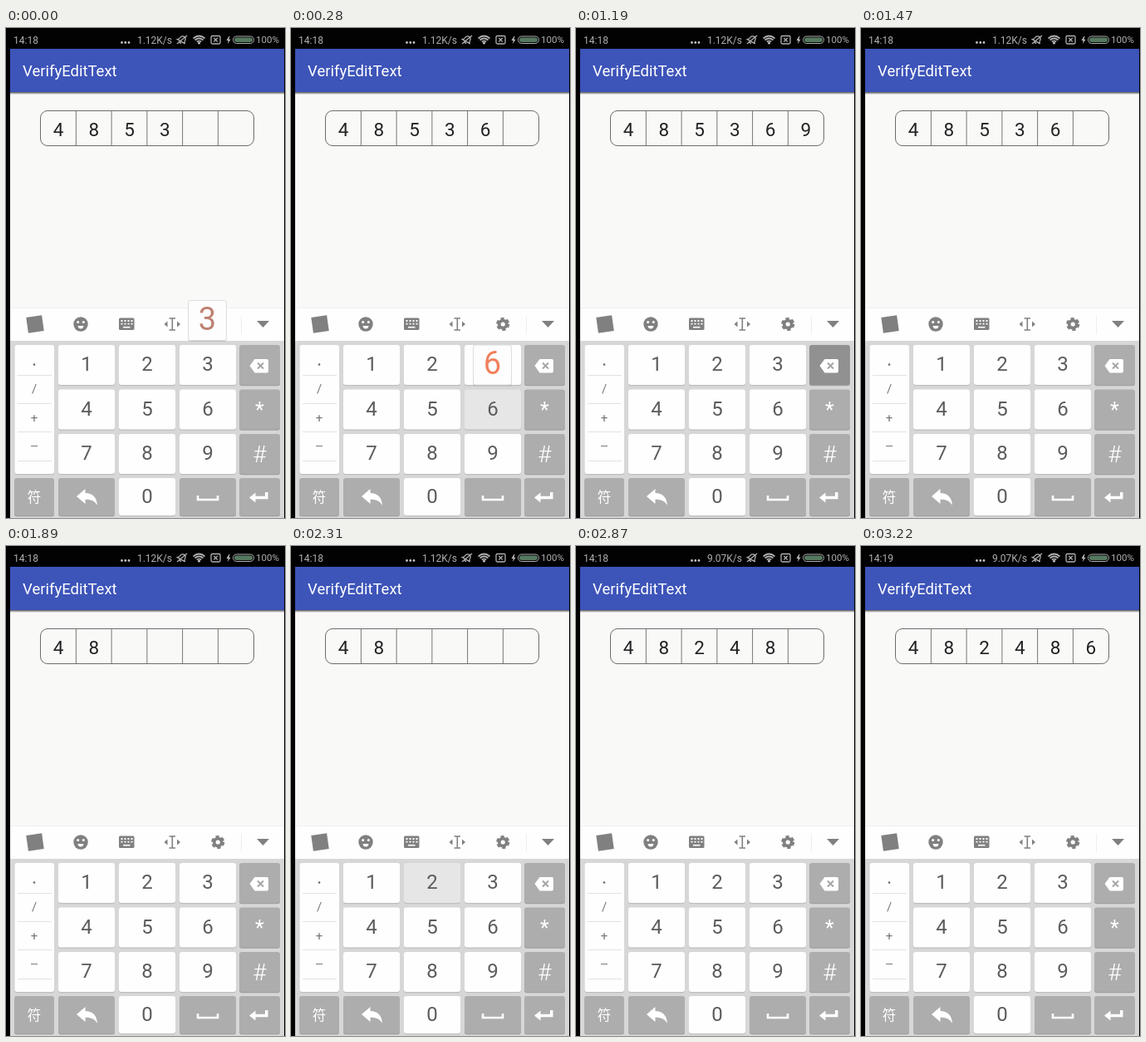
An HTML page that plays this animation: 336x589 px, repeating every 3710 ms.

```html
<!DOCTYPE html>
<html lang="en">
<head>
<meta charset="utf-8">
<title>Verify code input</title>
<style>
  html, body { margin: 0; width: 100%; height: 100%; overflow: hidden; background: #000; }
  svg { display: block; width: 100vw; height: 100vh; }
  text { font-family: Roboto, "Noto Sans", sans-serif; }
  .mid { text-anchor: middle; }
  .status { font-size: 12px; fill: #b0b0b0; }
  .cjk { font: 16.5px "Noto Sans CJK SC", "Noto Sans CJK", sans-serif; fill: #fff; }
  .code { font-size: 22.5px; fill: #222; }
  .digit { font-size: 24px; fill: #5c5c5c; }
  .sign { font-size: 15px; fill: #777; }
  .light { fill: #fefefe; }
  .gray { fill: #adadad; }
  .light.down { fill: #e6e6e6; }
  .gray.down { fill: #919191; }
</style>
</head>
<body>
<svg viewBox="0 0 336 589" preserveAspectRatio="none">
  <defs>
    <linearGradient id="shade" x2="0" y2="1">
      <stop stop-color="#000" stop-opacity=".65"/>
      <stop offset="1" stop-color="#000" stop-opacity="0"/>
    </linearGradient>
  </defs>

  <rect width="336" height="589" fill="#020203"/>
  <rect x="5" y="25" width="330" height="564" fill="#f9f9f8"/>
  <rect x="5" y="25" width="330" height="52" fill="#3d54b9"/>
  <rect x="5" y="77" width="330" height="3" fill="url(#shade)"/>
  <text x="20" y="58" font-size="18.5" fill="#fff">VerifyEditText</text>

  <!-- status bar -->
  <text id="clock" class="status" x="9" y="18.5"></text>
  <text id="speed" class="status" x="200" y="18.5" text-anchor="end"></text>
  <text class="status" x="301" y="18" style="font-size:11.5px">100%</text>
  <g fill="#c0c0c0">
    <circle cx="139.5" cy="17.5" r="1.4"/><circle cx="143.8" cy="17.5" r="1.4"/><circle cx="148" cy="17.5" r="1.4"/>
    <path d="M268.500 10l-3 5h2.200l-.8 4 3.600-5.300h-2.200l1.200-3.700z"/>
    <circle cx="232.500" cy="18" r="1.600"/>
  </g>
  <g fill="none" stroke="#b0b0b0" stroke-width="1.300">
    <path d="M207 16.500q2-1.500 2-4.500 1-2.500 3.500-2.500t3 3q0 3 2 4zM210.500 18.500h3" transform="rotate(30 212 14)"/>
    <path d="M206 19l12-10"/>
    <path d="M225.500 12.500q7-6 14 0M227.500 14.500q5-4 10 0M229.800 16.500q2.700-2 5.400 0" stroke-width="1.700"/>
    <rect x="247" y="9.500" width="11" height="9.500" rx="1.500"/>
    <path d="M250.300 12l4.400 4.500m0-4.500l-4.400 4.500"/>
    <rect x="273.500" y="10" width="25" height="8.500" rx="4.200" stroke-width="1"/>
  </g>
  <rect x="275" y="11.500" width="22" height="5.500" rx="2.700" fill="#55795f"/>

  <!-- code boxes -->
  <g id="code">
    <rect x="41.500" y="99.500" width="257" height="42" rx="8.500" fill="none" stroke="#6c6c6c"/>
  </g>

  <!-- keyboard toolbar -->
  <rect x="5" y="337" width="330" height="39" fill="#fefefe"/>
  <path d="M5 336.500h330" stroke="#f0f0f0"/>
  <path d="M283.500 346v22" stroke="#eee"/>
  <g fill="#808080">
    <rect x="25.500" y="346.500" width="19" height="19" transform="rotate(-8 35 356)"/>
    <circle cx="90" cy="356" r="8.700"/>
    <rect x="136" y="348.500" width="18.500" height="14.500" rx="1.500"/>
    <path d="M194.500 352.500v7l-4-3.500zM206 352.500v7l4-3.500z"/>
    <path d="M302 352h15l-7.500 8z"/>
    <circle cx="255.200" cy="356" r="6.300"/>
  </g>
  <circle cx="255.200" cy="356" r="6.200" fill="none" stroke="#808080" stroke-width="3.800" stroke-dasharray="3.800 2.693"/>
  <circle cx="255.200" cy="356" r="2.600" fill="#fefefe"/>
  <path d="M196.500 349h7.500M196.500 363h7.500M200.300 349v14" stroke="#808080" stroke-width="1.600"/>
  <g fill="#fefefe">
    <circle cx="86.700" cy="353.500" r="1.500"/><circle cx="93.300" cy="353.500" r="1.500"/>
    <path d="M86.500 358h7q-.5 3.500-3.500 3.500t-3.500-3.500z"/>
  </g>
  <path d="M138.500 352h14M138.500 355.700h14" stroke="#fefefe" stroke-width="1.800" stroke-dasharray="2 2"/>
  <path d="M141 359.700h8.500" stroke="#fefefe" stroke-width="1.600"/>

  <!-- keyboard -->
  <rect x="5" y="376" width="330" height="213" fill="#d7d7d7"/>
  <g id="keys"></g>
  <path d="M14 417.500h41M14 451.500h41M14 485.500h41M14 520.500h41" stroke="#e2e2e2"/>
  <g class="mid">
    <circle cx="34" cy="404.500" r="1.300" fill="#666"/>
    <text class="sign" x="34" y="438.500">/</text>
    <text class="sign" x="34" y="473.500">+</text>
    <path d="M30 502.500h8" stroke="#888" stroke-width="1.200"/>
    <text class="cjk" x="34" y="570">符</text>
    <text x="305.500" y="468" font-size="25" fill="#fff">*</text>
    <text x="305.500" y="522" font-size="28" font-weight="300" fill="#fff">#</text>
  </g>
  <g fill="#fff">
    <path d="M293.500 406l6-8h14.500q2 0 2 2v12.500q0 2-2 2h-14.500z"/>
    <path d="M85 563l10.500-9v5q13 0 14.500 14.500-4-7-14.500-7v5.500z"/>
    <path d="M293 564.500l7.500-6v4.300h11.500v-4.800h3.500v8.200h-15v4.300z"/>
  </g>
  <path d="M303 402.500l7 7m0-7l-7 7" stroke="#a5a5a5" stroke-width="2"/>
  <path d="M231 562v5h24v-5" fill="none" stroke="#fff" stroke-width="2.600"/>

  <g id="bubble">
    <rect x="-23.500" y="1" width="47" height="49" rx="3" fill="#000" opacity=".1"/>
    <rect x="-23" y=".5" width="46" height="48" rx="3" fill="#fdfdfd" stroke="#dcdcdc"/>
    <text class="mid" y="35.500" font-size="38"></text>
  </g>
</svg>
<script>
const LOOP = 3710;
const tracks = {
  code: [[0, "4853"], [280, "48536"], [630, "485369"], [1260, "48536"], [1540, "4853"], [1680, "485"],
         [1820, "48"], [2380, "482"], [2590, "4824"], [2800, "48248"], [3080, "482486"]],
  key: [[0, ""], [210, "6"], [420, ""], [490, "9"], [630, ""], [1190, "del"], [1400, ""], [1540, "del"],
        [1890, ""], [2310, "2"], [2450, ""], [2520, "4"], [2660, ""], [2730, "8"], [2800, ""],
        [3010, "6"], [3150, ""]],
  bubble: [[0, "3"], [70, ""], [280, "6"], [420, ""], [490, "9"], [630, ""], [2380, "2"], [2520, ""],
           [2590, "4"], [2730, ""], [2800, "8"], [2870, ""], [3080, "6"], [3220, ""]],
  speed: [[0, "1.12K/s"], [2450, "9.07K/s"]],
  clock: [[0, "14:18"], [3150, "14:19"]]
};
const $ = id => document.getElementById(id);
const at = (name, t) => tracks[name].findLast(step => step[0] <= t)[1];

function add(parent, tag, attrs, text = "") {
  const el = document.createElementNS("http://www.w3.org/2000/svg", tag);
  for (const k in attrs) el.setAttribute(k, attrs[k]);
  el.textContent = text;
  return parent.appendChild(el);
}

const keys = {};
function addKey(name, kind, x, y, width, height) {
  const box = { x, width, height, rx: 3 };
  add($("keys"), "rect", { ...box, y: y + 1.2, fill: kind === "gray" ? "#a0a0a0" : "#bebebe" });
  keys[name] = add($("keys"), "rect", { ...box, y, class: kind });
  if (/^\d$/.test(name))
    add($("keys"), "text", { x: x + width / 2, y: y + height / 2 + 7.4, class: "digit mid" }, name);
}

const colX = [63, 136, 209], rowY = [381, 434.5, 488];
for (let n = 1; n <= 9; n++)
  addKey(String(n), "light", colX[(n - 1) % 3], rowY[Math.floor((n - 1) / 3)], 68, 48);
addKey("signs", "light", 10.5, 381, 47.5, 155);
["del", "star", "hash"].forEach((name, i) => addKey(name, "gray", 281, rowY[i], 49, 48));
addKey("symbols", "gray", 10, 541, 48, 45);
addKey("back", "gray", 63, 541, 68, 45);
addKey("0", "light", 136, 541, 68, 45);
addKey("space", "gray", 209, 541, 68, 45);
addKey("enter", "gray", 281, 541, 49, 45);

const PITCH = 42.75;
for (let i = 1; i < 6; i++)
  add($("code"), "path", { d: `M${41.6 + i * PITCH} 100v41`, stroke: "#777" });
const cells = Array.from({ length: 6 }, (_, i) =>
  add($("code"), "text", { x: 63 + i * PITCH, y: 130, class: "code mid" }));

function draw(t) {
  const code = at("code", t), key = at("key", t), pop = at("bubble", t);
  cells.forEach((cell, i) => cell.textContent = code[i] || "");
  for (const name in keys) keys[name].classList.toggle("down", name === key);
  $("clock").textContent = at("clock", t);
  $("speed").textContent = at("speed", t);

  const bubble = $("bubble");
  bubble.style.display = pop ? "" : "none";
  if (!pop) return;
  const x = colX[(pop - 1) % 3] + 34, y = rowY[Math.floor((pop - 1) / 3)] - 54;
  bubble.setAttribute("transform", `translate(${x - .5} ${y})`);
  const label = bubble.querySelector("text");
  label.textContent = pop;
  label.setAttribute("fill", pop === key ? "#f0805c" : "#bd8171");
}

const start = performance.now();
function tick() {
  draw((performance.now() - start) % LOOP);
  requestAnimationFrame(tick);
}
tick();
</script>
</body>
</html>
```
